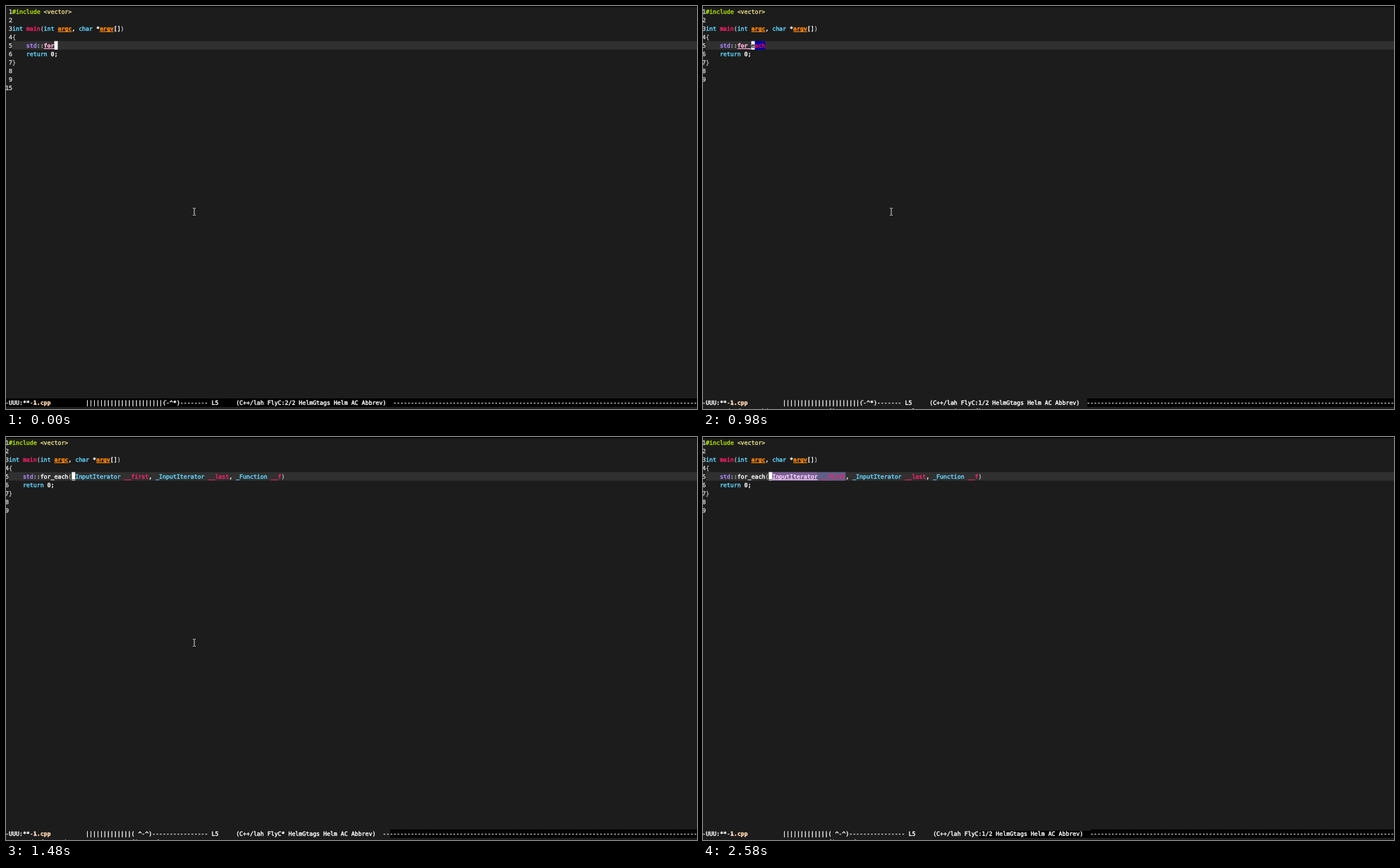
These frames come from a looping animation (980x571 px, 3620 ms). An HTML page with a canvas:

```html
<!DOCTYPE html>
<html lang="en">
<head>
<meta charset="utf-8">
<title>C++ completion in a terminal editor</title>
<style>
html, body { margin: 0; width: 100%; height: 100%; overflow: hidden; background: #1c1c1c; }
canvas { display: block; }
</style>
</head>
<body>
<canvas id="stage" width="980" height="571"></canvas>
<script>
const ctx = document.getElementById('stage').getContext('2d');
const LOOP = 3620, CELL = 4.955, LINE = 12.06, LEFT = -0.9, TOP = 1.5;
const FONT = '8.23px "DejaVu Sans Mono", monospace';

// Style: [colour, bold, underlined]
const STYLES = {
  text: ['#fff'], dim: ['#b2b2b2'], number: ['#d0d0d0'], black: ['#101000'],
  directive: ['#afe000'], header: ['#e6db86'], type: ['#5fd7ff'], name: ['#ff1f6b'],
  arg: ['#ff8700', true, true], space: ['#af87ff'], typed: ['#ffafd7', true, true],
  ghost: ['#ff0030'], match: ['#e00000'], hint: ['#870000'],
  file: ['#ffd7af', true], field: ['#ffd7ff', false, true]
};
const ARGS = '_InputIterator __first, _InputIterator __last, _Function __f)';

const xAt = col => LEFT + col * CELL;
const yAt = row => TOP + (row - 1) * LINE;

function fill(col, row, cols, color, rows = 1) {
  ctx.fillStyle = color;
  ctx.fillRect(xAt(col), yAt(row), cols * CELL, rows * LINE);
}

// Writes alternating style and text values on the character grid.
function write(col, row, ...parts) {
  const y = yAt(row) + 9;
  for (let i = 0; i < parts.length; i += 2) {
    const [color, bold, underlined] = STYLES[parts[i]], text = parts[i + 1];
    ctx.fillStyle = ctx.strokeStyle = color;
    ctx.font = (bold ? 'bold ' : '') + FONT;
    if (underlined) ctx.fillRect(xAt(col), Math.round(y) + 1, text.length * CELL, 1);
    for (const ch of text) {
      const x = xAt(col++);
      ctx.fillText(ch, x, y);
      ctx.strokeText(ch, x, y);
    }
  }
}

function cursor(col, ch = ' ') {
  fill(col, 5, 1, '#fff');
  write(col, 5, 'black', ch);
}

function drawPopup() {
  fill(9, 6, 72, '#c8c800', 3);
  fill(9, 6, 72, '#ffaf00');
  write(10, 6, 'match', 'for', 'black', '_each', 'hint', '(' + ARGS);
  write(10, 7, 'match', 'for', 'black', 'ward',
    'hint', '<class _Tp>(typename std::remove_reference<_Tp>::type &__t)');
  write(10, 8, 'match', 'for', 'black', 'ward_iterator_tag');
}

function drawCall(col, selected) {
  if (selected) {
    fill(col, 5, 14, '#7a5f94');
    fill(col + 14, 5, 8, '#5f5f87');
  }
  write(col, 5, selected ? 'field' : 'type', '_InputIterator', 'name', ' __first', 'text', ', ',
    'type', '_InputIterator', 'name', ' __last', 'text', ', ',
    'type', '_Function', 'name', ' __f', 'dim', ')');
  cursor(col, '_');
}

function drawCode(t) {
  const wide = t < 680 || (t >= 1160 && t < 1480), popup = t >= 680 && t < 980;
  const left = wide ? 2 : 1, indent = left + 4, word = indent + 5;

  fill(left, 5, 200, '#303030');
  for (let n = 1; n <= 9; n++) {
    if (!popup || n < 7) write(left - 1, n, 'number', String(n));
  }
  if (t >= 1160 && t < 1310) {
    for (let n = 10; n <= 15; n++) write(0, n, 'number', String(n));
  } else if (wide) {
    write(0, 10, 'number', '15');
  }

  write(left, 1, 'directive', '#include ', 'header', '<vector>');
  write(left, 3, 'type', 'int ', 'name', 'main', 'dim', '(', 'type', 'int ', 'arg', 'argc',
    'text', ', ', 'type', 'char ', 'text', '*', 'arg', 'argv', 'text', '[]', 'dim', ')');
  write(left, 4, 'dim', '{');
  write(indent, 6, 'type', 'return ', 'text', '0;');
  write(left, 7, 'dim', '}');
  write(indent, 5, 'space', 'std', 'dim', '::');

  if (t < 980) {
    write(word, 5, 'typed', 'for');
    cursor(word + 3);
    if (popup) drawPopup();
  } else if (t < 1160) {
    write(word, 5, 'typed', 'for_');
    fill(word + 4, 5, 4, '#0000af');
    write(word + 5, 5, 'ghost', 'ach');
    cursor(word + 4, 'e');
  } else if (t < 1480) {
    if (t < 1310) write(word, 5, 'typed', 'for_', 'dim', 'each');
    else write(word, 5, 'typed', 'for_ea', 'dim', 'ch');
    fill(word + 9, 5, 1, '#0000af');
    write(word + 9, 5, 'ghost', 'h');
    cursor(word + 8, 'c');
  } else {
    write(word, 5, 'text', 'for_each', 'dim', '(');
    drawCall(word + 9, t >= 1630);
  }
}

function drawModeLine(t) {
  const blackFrom = t < 680 ? 0 : t < 1630 ? 545 : t < 1980 ? 550 : 391;
  ctx.fillStyle = '#000';
  ctx.fillRect(blackFrom, 558, 980, 10);
  ctx.fillRect(Math.min(blackFrom || 550, 550) === 391 ? 550 : blackFrom, 556, 980, 2);

  const checking = (t >= 450 && t < 680) || (t >= 1160 && t < 1630) || (t >= 1980 && t < 2130);
  const check = checking ? '*' : t < 680 ? ':2/2' : ':1/2';
  const [bars, face] = t < 1160 ? [22, '(-^*)'] : t < 1480 ? [21, '(^-^ )'] : [13, '( ^-^)'];
  const lineCol = t >= 680 && t < 1160 ? 58 : 59;
  const meter = ('|'.repeat(bars) + face).padEnd(lineCol - 24, '-');
  const modes = `L5     (C++/lah FlyC${check} HelmGtags Helm AC Abbrev)  `;

  write(0, 47, 'text', '-UUU:**-', 'file', '1.cpp');
  write(8, 47, 'text', '-');
  write(23, 47, 'text', meter + ' ' + modes.padEnd(199 - lineCol, '-'));
  if (t < 1160) {
    ctx.fillStyle = '#fff';
    ctx.fillRect(226, 558.5, 1.5, 1);
  }
}

function drawEcho(t) {
  if (t < 680) return;
  if (t < 1480) write(0, 48, 'text', '     std::for_each(' + ARGS);
  else write(t < 1810 ? 5 : 19, 48, 'text', (t < 1810 ? 'std::for_each ' : '') + '_InputIterator __first, f');
}

function drawPointer() {
  ctx.fillStyle = '#d8d8d8';
  ctx.fillRect(266.5, 287, 1, 9);
  for (const y of [286, 296]) {
    ctx.fillRect(265, y, 1.5, 1);
    ctx.fillRect(267.5, y, 1.5, 1);
  }
}

function draw(now) {
  const t = now % LOOP;
  ctx.fillStyle = '#1c1c1c';
  ctx.fillRect(0, 0, 980, 571);
  ctx.fillStyle = '#000';
  ctx.fillRect(0, 0, 980, 1.5);
  drawCode(t);
  drawModeLine(t);
  drawEcho(t);
  if (t < 2580) drawPointer();
  requestAnimationFrame(draw);
}

ctx.textRendering = 'geometricPrecision';
ctx.lineWidth = 0.4;
ctx.lineJoin = 'round';
draw(performance.now());
</script>
</body>
</html>
```
